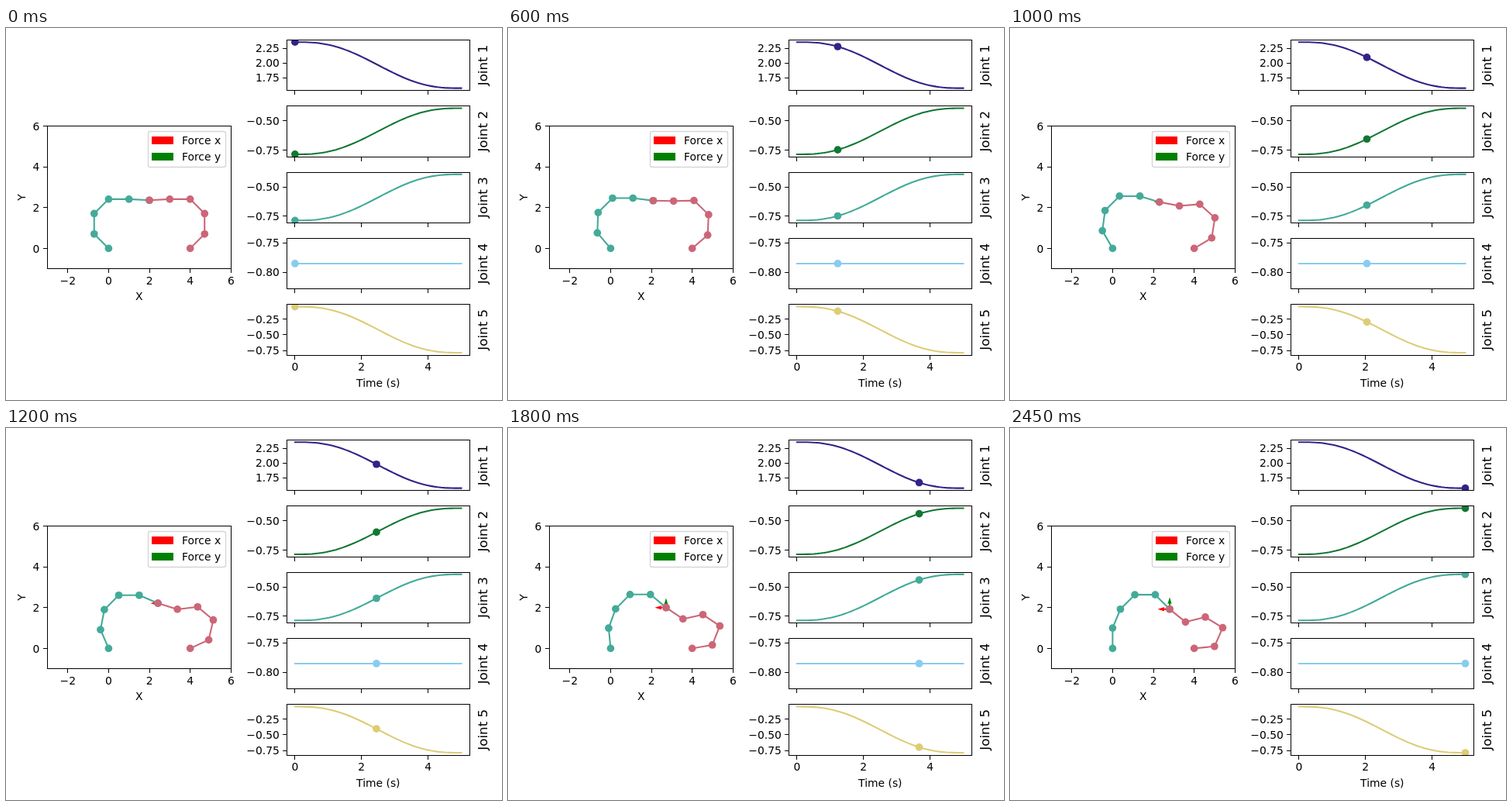
These frames come from a looping animation (640 px wide and 480 px high, 2.5 s). An HTML page:

```html
<!DOCTYPE html>
<html lang="en">
<head>
<meta charset="utf-8">
<title>Two-arm joint motion</title>
<style>
  html, body { margin: 0; width: 100%; height: 100%; overflow: hidden; background: #fff; }
  svg { display: block; width: 640px; height: 480px; }
  text { font: 13.89px "DejaVu Sans", sans-serif; fill: #000; }
  .name { font-size: 16.67px; }
  .axis { fill: none; stroke: #000; stroke-width: 1; shape-rendering: crispEdges; }
  .line { fill: none; stroke-width: 2.08; stroke-linecap: square; stroke-linejoin: round; }
</style>
</head>
<body>
<svg id="stage" viewBox="0 0 640 480"></svg>
<script>
const STEPS = 50, STEP_MS = 50, R = 4.86;
const stage = document.getElementById('stage');

function add(tag, attrs, parent = stage) {
  const el = document.createElementNS('http://www.w3.org/2000/svg', tag);
  for (const k in attrs) el.setAttribute(k, attrs[k]);
  parent.appendChild(el);
  return el;
}

function label(str, x, y, anchor = 'middle', turned = false, cls = '') {
  add('text', {
    transform: `translate(${x} ${y})` + (turned ? ' rotate(-90)' : ''),
    'text-anchor': anchor, class: cls
  }).textContent = str;
}

const signed = s => String(s).replace('-', '\u2212');
const snap = v => Math.floor(v) + 0.5;
const tickX = (x, y) => add('path', { class: 'axis', d: `M${snap(x)} ${y}v5` });
const tickY = (x, y) => add('path', { class: 'axis', d: `M${x} ${snap(y)}h-5` });
const frame = (x, y, w, h) => add('rect', { class: 'axis', x, y, width: w, height: h });
const points = list => list.map(p => p.map(v => v.toFixed(2)).join()).join(' ');
const ease = s => s * s * s * (10 - 15 * s + 6 * s * s);

// Joint trajectories of the left arm
const PI = Math.PI, TILT = PI / 60;
const joints = [
  { from: 3 * PI / 4, to: PI / 2, color: '#332288', ticks: ['2.25', '2.00', '1.75'] },
  { from: -PI / 4, to: -PI / 8, color: '#117733', ticks: ['-0.50', '-0.75'] },
  { from: -PI / 4, to: -PI / 8, color: '#44aa99', ticks: ['-0.50', '-0.75'] },
  { from: -PI / 4, to: -PI / 4, color: '#88ccee', ticks: ['-0.75', '-0.80'] },
  { from: -TILT, to: -PI / 4, color: '#ddcc77', ticks: ['-0.25', '-0.50', '-0.75'] }
];
const angle = (j, u) => j.from + (j.to - j.from) * u;

// Arm kinematics: unit links
function chain(x, y, q) {
  const pts = [[x, y]];
  let dir = 0;
  for (const a of q) {
    dir += a;
    pts.push([x += Math.cos(dir), y += Math.sin(dir)]);
  }
  return { pts, pose: [x, y, dir] };
}

const det = ([a, b, c]) =>
  a[0] * (b[1] * c[2] - b[2] * c[1]) -
  a[1] * (b[0] * c[2] - b[2] * c[0]) +
  a[2] * (b[0] * c[1] - b[1] * c[0]);

// Cramer's rule for a symmetric 3x3 system
function solve(m, v) {
  const d = det(m);
  return [0, 1, 2].map(i => det(m.map((row, k) => k === i ? v : row)) / d);
}

// Least-norm joint change that moves the arm tip to the goal pose
function follow(x, y, q, goal) {
  for (let n = 0; n < 4; n++) {
    const { pts, pose } = chain(x, y, q);
    const jac = q.map((_, i) => [pts[i][1] - pose[1], pose[0] - pts[i][0], 1]);
    const m = [0, 1, 2].map(r => [0, 1, 2].map(c =>
      jac.reduce((sum, col) => sum + col[r] * col[c], 0)));
    const w = solve(m, goal.map((g, i) => g - pose[i]));
    q = q.map((a, i) => a + jac[i][0] * w[0] + jac[i][1] * w[1] + jac[i][2] * w[2]);
  }
  return q;
}

const toPx = ([x, y]) => [132.4 + 26.32 * x, 284.4 - 26.32 * y];
const poses = [];
let q = joints.map(j => -j.from);
q[0] = PI / 4;
for (let i = 0; i < STEPS; i++) {
  const s = i / (STEPS - 1), u = ease(s);
  const left = chain(0, 0, joints.map(j => angle(j, u)));
  const [x, y, dir] = left.pose;
  q = follow(4, 0, q, [x, y, dir + PI + 2 * TILT]);
  poses.push({ s, u, left: left.pts.map(toPx), right: chain(4, 0, q).pts.map(toPx) });
}

// Workspace plot
const forceX = add('polygon', { fill: '#f00' });
const forceY = add('polygon', { fill: '#008000' });

function makeArm(color) {
  const g = add('g', { fill: color, stroke: color });
  const line = add('polyline', { class: 'line' }, g);
  const dots = Array.from({ length: 6 }, () => add('circle', { r: R, stroke: 'none' }, g));
  return pts => {
    line.setAttribute('points', points(pts));
    dots.forEach((d, i) => place(d, ...pts[i]));
  };
}

function place(dot, x, y) {
  dot.setAttribute('cx', x);
  dot.setAttribute('cy', y);
}

const drawLeft = makeArm('#44aa99');
const drawRight = makeArm('#cc6677');

function arrow(el, [x, y], len, turn) {
  const k = Math.min(1, len / 8.9), w = 0.89 * k, neck = len - 8 * k, head = len - 8.9 * k;
  el.setAttribute('points', points([
    [0, -w], [neck, -w], [head, -3 * w], [len, 0], [head, 3 * w], [neck, w], [0, w]
  ]));
  el.setAttribute('transform', `translate(${x} ${y}) rotate(${turn})`);
}

frame(53.5, 126.5, 237, 184);
for (let v = -2; v <= 6; v += 2) {
  const [x, y] = toPx([v, v]);
  tickX(x, 311);
  label(signed(v), x, 331);
  if (v < 0) continue;
  tickY(53, y);
  label(v, 43.3, y + 5.2, 'end');
}
label('X', 171.8, 351);
label('Y', 25, 218.5, 'middle', true);

add('rect', {
  x: 183.5, y: 133.5, width: 100, height: 46, rx: 2.8,
  fill: '#fff', 'fill-opacity': 0.8, stroke: '#ccc', 'stroke-opacity': 0.8, 'stroke-width': 1.39
});
[['Force x', '#f00', 140], ['Force y', '#008000', 161]].forEach(([str, fill, y]) => {
  add('rect', { x: 188, y, width: 28, height: 10, fill });
  label(str, 227, y + 10, 'start');
});

// Joint plots
const timeX = s => 372.9 + 214.6 * s;
const H = 65.4;
const clips = add('defs', {});
joints.forEach((j, k) => {
  const top = 15.2 + 85.35 * k;
  const y0 = Math.round(top - 0.2), y1 = Math.round(top + H - 0.2);
  const pad = j.from === j.to ? Math.abs(j.from) * 0.05 : 0;
  const hi = Math.max(j.from, j.to) + pad, lo = Math.min(j.from, j.to) - pad;
  j.y = v => top + H / 22 + (hi - v) / (hi - lo) * H / 1.1;

  const clip = add('clipPath', { id: 'clip' + k }, clips);
  add('rect', { x: 362, y: y0, width: 237, height: y1 - y0 + 1 }, clip);
  const g = add('g', { 'clip-path': `url(#clip${k})`, fill: j.color, stroke: j.color });
  add('polyline', {
    class: 'line', points: points(poses.map(p => [timeX(p.s), j.y(angle(j, p.u))]))
  }, g);
  j.dot = add('circle', { r: R, stroke: 'none' }, g);

  frame(362.5, y0 + 0.5, 236, y1 - y0);
  for (const str of j.ticks) {
    const y = j.y(+str);
    tickY(362, y);
    label(signed(str), 352.8, y + 5.2, 'end');
  }
  for (let t = 0; t <= 4; t += 2) {
    tickX(timeX(t / 5), y1 + 1);
    if (k === 4) label(t, timeX(t / 5), 442);
  }
  label('Joint ' + (k + 1), 621, top + H / 2, 'middle', true, 'name');
});
label('Time (s)', 480.3, 463);

function draw(i) {
  const { s, u, left, right } = poses[i];
  drawLeft(left);
  drawRight(right);
  arrow(forceX, left[5], 24 * u - 8.5 * u * u, 180);
  arrow(forceY, left[5], 15.5 * u ** 1.8, -90);
  for (const j of joints) place(j.dot, timeX(s), j.y(angle(j, u)));
}

const start = performance.now();
function tick() {
  draw(Math.floor((performance.now() - start) / STEP_MS) % STEPS);
  requestAnimationFrame(tick);
}
tick();
</script>
</body>
</html>
```
